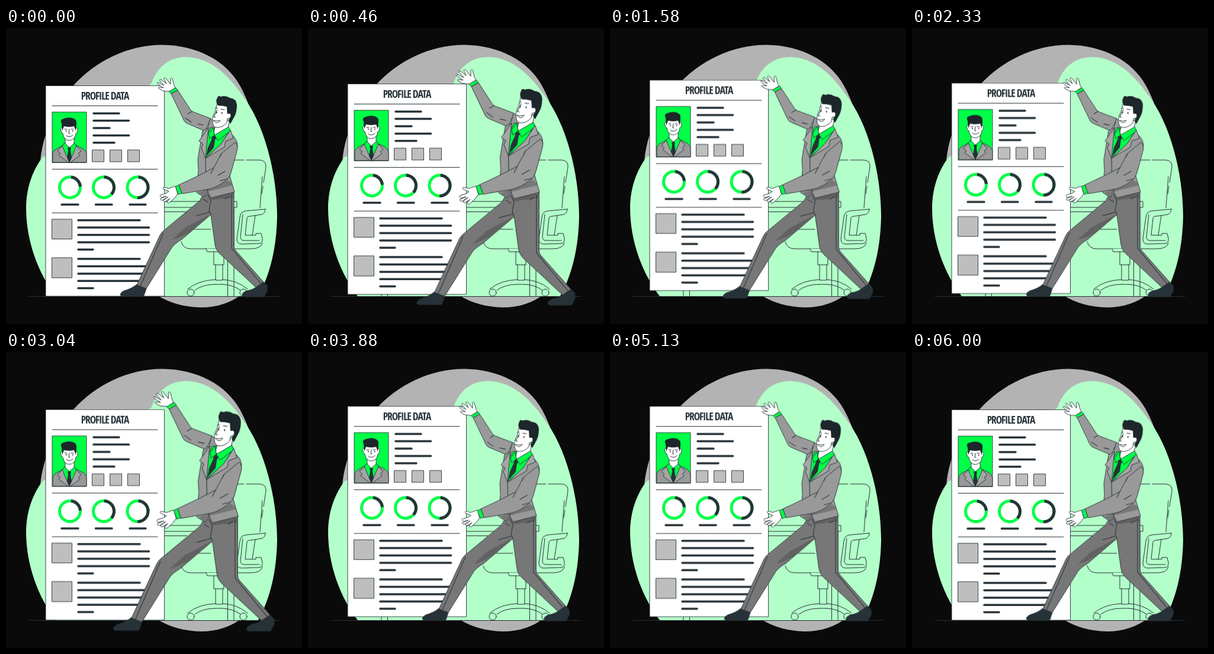
These frames come from a looping animation (500 px wide and 500 px high, 6040 ms). An HTML page:

```html
<!DOCTYPE html>
<html lang="en">
<head>
<meta charset="utf-8">
<title>Profile data</title>
<style>
  :root { --ink: #263238; --green: #00ff47; --mint: #b3ffc9; --suit: #999; --shade: #777; }
  html, body { margin: 0; width: 100%; height: 100%; overflow: hidden; background: #0a0a0a; }
  svg { display: block; width: 100vw; height: 100vh; }
  .line { fill: none; stroke: var(--ink); stroke-width: 1; stroke-linecap: round; stroke-linejoin: round; }
  .shape { stroke: var(--ink); stroke-width: .9; stroke-linejoin: round; }
  .bars { fill: none; stroke: var(--ink); stroke-width: 3.5; stroke-linecap: round; }
  .white { fill: #fff; }
  .green { fill: var(--green); }
  .suit { fill: var(--suit); }
  .lapel { fill: #a6a6a6; }
  .shade { fill: var(--shade); }
  .fold { fill: #616161; }
  .dark { fill: var(--ink); }
  .hair { fill: #1c262b; }
  .box { fill: #bdbebd; }
  .ring { fill: none; stroke-width: 5; }
  .title {
    font: 700 17.5px "Open Sans Condensed", "Open Sans", "Roboto Condensed", "Liberation Sans Narrow", sans-serif;
    font-stretch: condensed; letter-spacing: -1.1px; text-anchor: middle; fill: var(--ink);
  }

  /* six seconds of motion and one held frame */
  #panel { animation: hover 6040ms linear infinite; }
  #man { transform-origin: 317.5px 269px; animation: beat 6040ms linear infinite; }
  @keyframes hover {
    0%, 49.669%, 99.338%, 100% { transform: translateY(0); }
    24.834%, 74.503% { transform: translateY(-10px); }
  }
  @keyframes beat {
    0%, 29.801%, 39.735%, 59.603%, 100% { transform: scale(1); }
    9.934%, 49.669% { transform: scale(1.1); }
  }
</style>
</head>
<body>
<svg viewBox="0 0 500 500">
  <g id="backdrop">
    <path fill="#b3b3b3" d="M58 225C62 178 84 132 114 97C152 55 207 28.500 264 28.500C322 29 372 55 395 97C430 160 450 280 440 380C425 440 385 472 329 472C300 471 278 465 256 452L120 400Z"/>
    <path fill="var(--mint)" d="M84 453C55 415 34 360 34 305C34 270 45 240 62 218L150 180L246 93C256 64 277 49 305 49C340 50 370 72 398 112C436 160 458 245 458 318C457 370 447 415 426 453Z"/>
  </g>

  <g id="office" class="line">
    <path d="M120 293H390V303H120M268 310.500H306M124 303V453M134.500 303V453M374.500 303V453M385 303V453"/>
    <path d="M296 361Q299 373 312 373H413Q431 373 433 363M300 340H346"/>
    <path d="M384 223H402M406 223H429Q440 224 439 235L435 261M434 267L432 280M433 251L429 304"/>
    <path fill="var(--mint)" d="M438 306L405 309Q396 310 395 320L390 356Q390 365 398 365L428 364Q434 363 433 355L431 347H422V350H404L407 322Q407 318 412 318L432 315Q438 313 438 306Z"/>
    <path d="M400 315L396 353Q396 358 401 359H428M421 317L416 350"/>
    <path fill="var(--mint)" d="M338 373L340 378H382V373M351 378V400H368V378M354 400V426H366V400"/>
    <path d="M354 425Q325 426 307 441M354 433Q332 433 319 443M366 425Q390 426 408 441M366 433Q384 434 396 443M354 433H366"/>
    <circle cx="312" cy="447" r="6" fill="var(--mint)"/>
    <circle cx="401" cy="447" r="6"/>
  </g>
  <path class="line" d="M39 453.500H461"/>

  <g id="panel">
    <path class="shape white" d="M67 97.500H267.500V453H67Z"/>
    <text class="title" x="167" y="121">PROFILE DATA</text>
    <path class="line" d="M78 131.500H256M78 238.500H256M78 312.300H256"/>

    <g id="portrait">
      <path class="shape green" d="M78 142H136V227.500H78Z"/>
      <path class="shape suit" d="M79 227V213Q79 207 86 204L98 197H116L128 203Q135 206 136 213V227Z"/>
      <path class="shape green" d="M98 195L94 201L107 227L120 201L116 195Z"/>
      <path class="shape white" d="M100 184V195L107 202L115 195V184Z"/>
      <path class="shape lapel" d="M95 199L87 208L92 212L89 215L105 227H107ZM119 199L127 208L122 212L125 215L109 227H107Z"/>
      <path class="dark" d="M104 202H110L109 207L111 219L107 227L103 219L105 207Z"/>
      <path class="shape white" d="M95 169Q91 168 93 174Q94 178 96 178Q98 190 107 190Q117 189 118 178Q121 177 121 172Q121 168 118 169L116 160H96Z"/>
      <path class="hair" d="M95 174L94 161Q91 156 95 154Q104 150 112 152Q120 154 119 162L118 174L115 166Q107 168 98 166Z"/>
      <path class="line" d="M107 171L106 178H108M102 182Q107 186 113 181M99 171H103M110 171H114"/>
      <path class="dark" d="M101 173h1.500v2h-1.500zM112 173h1.500v2h-1.500z"/>
    </g>

    <path class="bars" d="M148 144.300H191M148 156.500H207.500M148 169H175M148 181.500H207.500M148 193.800H183"/>
    <path class="shape box" d="M145.500 206H165.500V226H145.500ZM175.500 206H195.500V226H175.500ZM205.500 206H225.500V226H205.500Z"/>

    <g class="ring" stroke="var(--green)">
      <circle cx="108" cy="269.200" r="17.500"/>
      <circle cx="165" cy="269.200" r="17.500"/>
      <circle cx="222.500" cy="269.200" r="17.500"/>
    </g>
    <g class="ring" stroke="var(--ink)">
      <circle cx="108" cy="269.200" r="17.500" pathLength="100" stroke-dasharray="22 78" transform="rotate(-84 108 269.200)"/>
      <circle cx="165" cy="269.200" r="17.500" pathLength="100" stroke-dasharray="36 64" transform="rotate(-88 165 269.200)"/>
      <circle cx="222.500" cy="269.200" r="17.500" pathLength="100" stroke-dasharray="49 51" transform="rotate(-86 222.500 269.200)"/>
    </g>
    <path class="bars" d="M94 298.200H122M151.500 298.200H179M209 298.200H236"/>

    <path class="shape box" d="M77.500 323H111.500V356.500H77.500ZM77.500 388H111.500V422H77.500Z"/>
    <path class="bars" d="M122 324.800H226M122 337H241.500M122 349.500H241.500M122 362H241.500M122 374.300H147M122 390H226M122 402.500H241.500M122 415H241.500M122 427.300H241.500M122 439.500H147"/>
  </g>

  <g id="man">
    <!-- shoes -->
    <path class="shape dark" d="M221 433L237 440L233 452Q231 454 226 453H195Q190 449 199 444Q213 440 221 433Z"/>
    <path class="shape dark" d="M423 437L434 428L441 435Q443 444 438 450L436 454H401Q395 449 406 444Q418 442 423 437Z"/>

    <!-- trousers -->
    <path class="shape shade" d="M336 276L385 276L385 368Q385 373 388 376L435 429L422 438L361 381Q354 374 353 366L346 315L297 357Q285 364 280 371L237 440L221 434L260 350Q263 344 269 340L327 292Z"/>
    <path class="fold" d="M345 286L385 278V286L346 291ZM280 358L303 337L341 317L346 316L314 343L295 353Z"/>
    <path class="line" d="M341 282L346 292L343 308L346 315M344 311L322 317M381 282L381 372L430 431M370 289L377 285M266 346L227 436M333 289L341 294"/>

    <!-- raised arm -->
    <path class="shape suit" d="M279 111L290 105L311 137Q313 141 317 142L346 153L336 174L308 162Q302 160 300 155Z"/>
    <path class="line" d="M303 152L313 159M314 141L307 145M333 164L324 162"/>
    <path class="shape green" d="M275 107L287 101L290 105L279 111Z"/>
    <path class="shape white" d="M276 107Q270 107 265 106L258 102Q256 100 259 100L266 101L257 95Q254 92 257 92L267 97L260 89Q259 86 262 87L271 94L267 86Q267 83 270 85L278 95L278 86Q279 83 281 86L284 97L286 101Z"/>

    <!-- jacket -->
    <path class="shape suit" d="M345 153L341 168L332 174L324 222L325 240L322 278L335 286L341 277L346 287L386 277L378 250L391 200Q391 187 380 179L374 172Z"/>
    <path class="shade" d="M324 278L348 270L375 257L381 262L382 266L342 276L335 285Z"/>
    <path class="line" d="M341 277L338 262L337 220"/>

    <!-- shirt and tie -->
    <path class="shape green" d="M346 168L340 180L337 219L363 197L378 172Z"/>
    <path class="dark" d="M349 181L357 183L353 189L351 202L338 217L341 202L347 189Z"/>
    <path class="shape white" d="M354 164L351 176L353 182L375 169L378 155Z"/>
    <path class="shape green" d="M350 168L342 179L344 187L352 181ZM376 167L352 181L358 190L379 174Z"/>
    <path class="shape lapel" d="M342 168L326 191L333 196L330 202L337 220L340 188ZM379 172L384 186L371 191L369 201L337 220L363 196Z"/>

    <!-- lower arm -->
    <path class="shape suit" d="M387 193Q393 198 390 208L381 241Q378 254 368 260Q358 268 344 272L297 280L292 265L328 248L351 236L364 212Z"/>
    <path class="line" d="M351 236L346 246M364 212L361 218M370 242L358 249M374 255L362 258"/>
    <path class="shape green" d="M286 268L292 265L297 279L291 281Z"/>
    <path class="shape white" d="M286 267L275 271L267 269Q264 269 266 272L275 276L271 279L261 282Q259 285 263 286L271 284L261 288Q260 291 264 291L274 285L266 291Q266 294 269 293L277 288L272 294Q274 297 277 294L285 287L290 280Z"/>

    <!-- head -->
    <path class="shape white" d="M357 126L353 142Q348 150 349 158Q349 168 357 168Q366 168 373 160L374 153Q380 153 380 147Q379 143 374 144L374 128Z"/>
    <path class="hair" d="M358 131Q353 123 357 118Q358 113 363 116Q370 113 378 118Q389 119 390 130Q390 143 385 151L379 162L376 158L377 153Q380 152 380 147Q379 143 374 145L373 133Q365 131 358 131Z"/>
    <path class="line" d="M357 138L351 150L354 151M354 136L357 135M363 137L369 138"/>
    <path class="shape white" d="M350 156Q356 158 362 156Q357 164 350 156Z"/>
    <path class="dark" d="M355 141h1.500v3h-1.500zM364 142h1.500v3h-1.500z"/>
  </g>
</svg>
</body>
</html>
```
